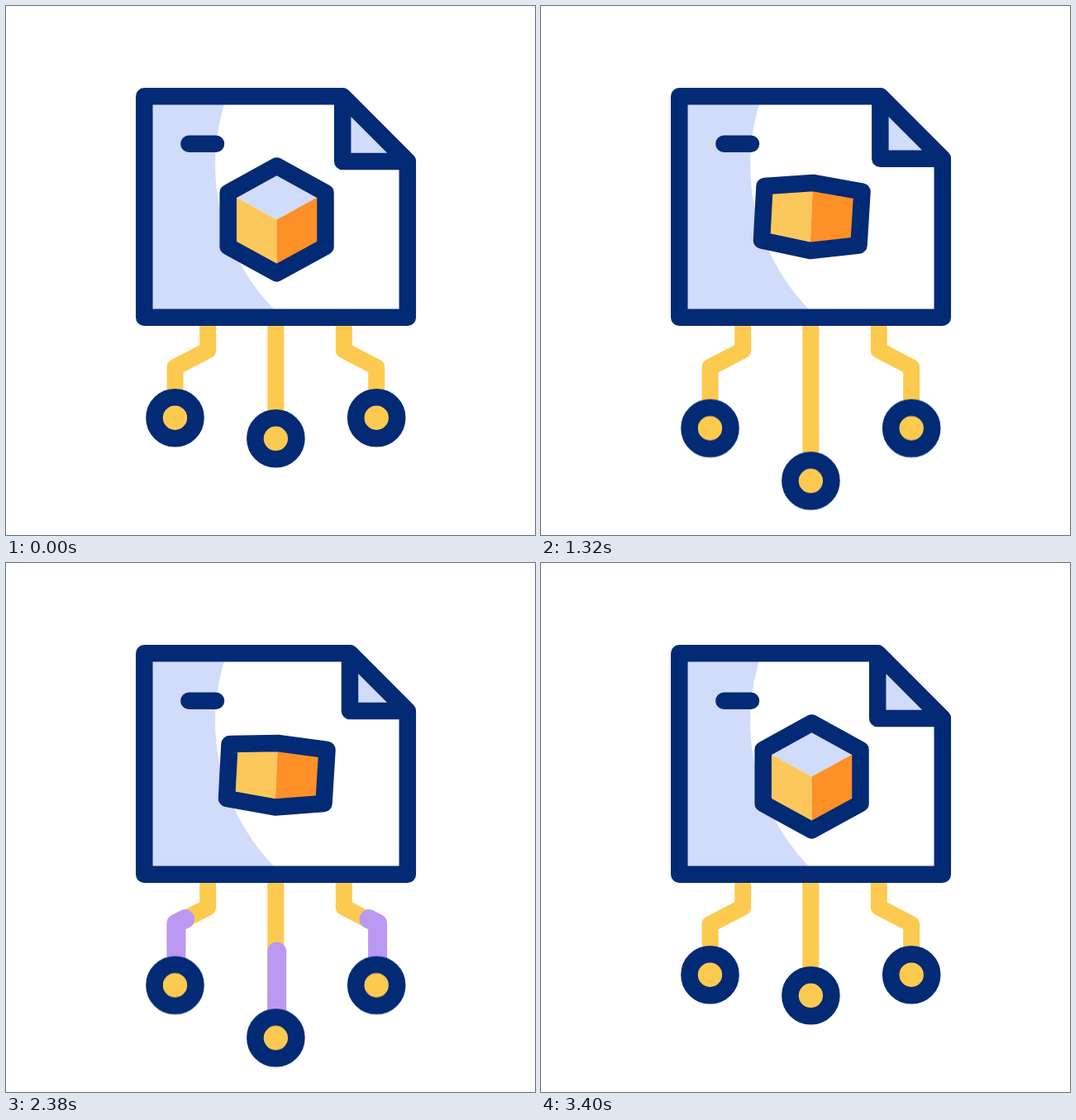
Recreate the animation shown at these times as an HTML page. Size 640 by 640 pixels, loop 3600 ms.

```html
<!DOCTYPE html>
<html lang="en">
<head>
<meta charset="utf-8">
<title>Contract network icon</title>
<style>
  html, body { margin: 0; width: 100%; height: 100%; overflow: hidden; background: #fff; }
  svg { display: block; width: 100vw; height: 100vh; }

  :root {
    --navy: #032a75;
    --light: #d1dbfa;
    --gold: #fdca50;
    --smooth: cubic-bezier(.3333, 0, .6667, 1);
    --rise: cubic-bezier(.3333, 0, .6667, .5);
    --settle: cubic-bezier(.3333, .5, .6667, 1);
  }

  .ink { fill: none; stroke: var(--navy); stroke-width: 20.5; stroke-linejoin: round; stroke-linecap: round; }
  .wire { fill: none; stroke: var(--gold); stroke-width: 20; stroke-linejoin: round; }
  .pulse { fill: none; stroke: #bb99f2; stroke-width: 23; stroke-linejoin: round; stroke-linecap: round; }
  .node { fill: var(--gold); stroke: var(--navy); stroke-width: 20.6; }

  .node, .sheet, .fold { animation: 3600ms var(--smooth) infinite; }
  .node { animation-name: drop; }
  .sheet { animation-name: sheet; }
  .fold { animation-name: fold; fill: var(--light); }
  .side { --drop: 12.6px; }
  .mid { --drop: 51.2px; }

  .pulse { animation: 3600ms linear infinite flow, 3600ms var(--smooth) infinite; }
  .pulse.left { animation-name: flow, left; }
  .pulse.mid { animation-name: flow, mid; }
  .pulse.right { animation-name: flow, right; }

  .cube path { animation: 3600ms infinite; }
  .cube .top { fill: var(--light); animation-name: top; }
  .cube .base { fill: #ff6250; animation-name: base; }
  .cube .west { fill: #fdc85b; animation-name: west; }
  .cube .east { fill: #fd9027; animation-name: east; }
  .cube .hull { animation-name: hull; }

  /* Nodes sink, wait, then spring back up */
  @keyframes drop {
    0%, 5.556%, 94.444%, 100% { transform: none; }
    27.778%, 83.333% { transform: translateY(var(--drop)); }
  }
  @keyframes left {
    0%, 5.556%, 94.444%, 100% { d: path("M245.4 374 V416 L206 436 V492"); }
    27.778%, 83.333% { d: path("M245.4 374 V416 L206 436 V505"); }
  }
  @keyframes mid {
    0%, 5.556%, 94.444%, 100% { d: path("M327.7 374 V523.3"); }
    27.778%, 83.333% { d: path("M327.7 374 V574.5"); }
  }
  @keyframes right {
    0%, 5.556%, 94.444%, 100% { d: path("M410 374 V416 L449.6 436 V492"); }
    27.778%, 83.333% { d: path("M410 374 V416 L449.6 436 V505"); }
  }

  /* Two pulses run down the wires and vanish under the nodes */
  @keyframes flow {
    0%, 5.556%, 48.889% { stroke-dasharray: 0 2; stroke-dashoffset: 0; }
    12.222%, 55.556% { stroke-dasharray: .43 2; stroke-dashoffset: -.178; }
    16.667%, 60% { stroke-dasharray: .7 2; stroke-dashoffset: -.3; }
    22.778%, 66.111% { stroke-dasharray: .522 2; stroke-dashoffset: -.478; }
    36.667%, 48.888%, 80%, 100% { stroke-dasharray: .05 2; stroke-dashoffset: -.95; }
  }

  /* The page corner shrinks and grows */
  @keyframes sheet {
    0%, 27.778%, 83.333%, 100% { d: path("M167.3 109.3 H407.2 L485.8 187.9 V376.8 H167.3 Z"); }
    55.556% { d: path("M167.3 109.3 H420.2 L485.8 174.9 V376.8 H167.3 Z"); }
  }
  @keyframes fold {
    0%, 27.778%, 83.333%, 100% { d: path("M407.2 109.3 V187.9 H485.8 Z"); }
    55.556% { d: path("M420.2 109.3 V174.9 H485.8 Z"); }
  }

  /* The cube tips back to show its base, then returns */
  @keyframes hull {
    0%, 27.778%, 75%, 100% { d: path("M327.5 193.5 L386.5 226 L386.5 291 L327.5 323.3 L268.7 291 L268.7 226 Z"); animation-timing-function: var(--rise); }
    36.667% { d: path("M329 214 L388.5 224.5 L384.5 289.5 L325.5 296 L267 283.5 L270.5 218 Z"); animation-timing-function: var(--settle); }
    45.556%, 57.222% { d: path("M324.5 187.5 L385.5 223 L388 290 L332.5 322.5 L270.5 296 L267.5 229 Z"); animation-timing-function: var(--rise); }
    66.111% { d: path("M329 218 L388.5 226 L384.5 291 L325.5 295.5 L267 285 L270.5 219 Z"); animation-timing-function: var(--settle); }
  }
  @keyframes top {
    0%, 27.778%, 75%, 100% { d: path("M327.5 193.5 L386.5 226 L327.5 258.5 L268.7 226 Z"); animation-timing-function: var(--rise); }
    36.667% { d: path("M329 214 L388.5 224.5 L329 214 L270.5 218 Z"); animation-timing-function: var(--settle); }
    45.556%, 57.222% { d: path("M324.5 187.5 L385.5 223 L324.5 187.5 L267.5 229 Z"); animation-timing-function: var(--rise); }
    66.111% { d: path("M329 218 L388.5 226 L329 218 L270.5 219 Z"); animation-timing-function: var(--settle); }
  }
  @keyframes base {
    0%, 27.778%, 75%, 100% { d: path("M327.5 323.3 L386.5 291 L327.5 323.3 L268.7 291 Z"); animation-timing-function: var(--rise); }
    36.667% { d: path("M325.5 296 L384.5 289.5 L325.5 296 L267 283.5 Z"); animation-timing-function: var(--settle); }
    45.556%, 57.222% { d: path("M328 262 L388 290 L332.5 322.5 L270.5 296 Z"); animation-timing-function: var(--rise); }
    66.111% { d: path("M325.5 295.5 L384.5 291 L325.5 295.5 L267 285 Z"); animation-timing-function: var(--settle); }
  }
  @keyframes west {
    0%, 27.778%, 75%, 100% { d: path("M268.7 226 L327.5 258.5 L327.5 323.3 L268.7 291 Z"); animation-timing-function: var(--rise); }
    36.667% { d: path("M270.5 218 L329 214 L325.5 296 L267 283.5 Z"); animation-timing-function: var(--settle); }
    45.556%, 57.222% { d: path("M267.5 229 L324.5 187.5 L328 262 L270.5 296 Z"); animation-timing-function: var(--rise); }
    66.111% { d: path("M270.5 219 L329 218 L325.5 295.5 L267 285 Z"); animation-timing-function: var(--settle); }
  }
  @keyframes east {
    0%, 27.778%, 75%, 100% { d: path("M386.5 226 L327.5 258.5 L327.5 323.3 L386.5 291 Z"); animation-timing-function: var(--rise); }
    36.667% { d: path("M388.5 224.5 L329 214 L325.5 296 L384.5 289.5 Z"); animation-timing-function: var(--settle); }
    45.556%, 57.222% { d: path("M385.5 223 L324.5 187.5 L328 262 L388 290 Z"); animation-timing-function: var(--rise); }
    66.111% { d: path("M388.5 226 L329 218 L325.5 295.5 L384.5 291 Z"); animation-timing-function: var(--settle); }
  }
</style>
</head>
<body>
<svg viewBox="0 0 640 640">
  <path class="wire" d="M244.2 377 V416.5 L204.6 437 V490"/>
  <path class="wire" d="M326.3 377 V550"/>
  <path class="wire" d="M408.8 377 V416.5 L448.2 437 V490"/>

  <path class="pulse left" pathLength="1" d="M245.4 374 V416 L206 436 V492"/>
  <path class="pulse mid" pathLength="1" d="M327.7 374 V523.3"/>
  <path class="pulse right" pathLength="1" d="M410 374 V416 L449.6 436 V492"/>

  <circle class="node side" cx="204.5" cy="498.2" r="25"/>
  <circle class="node mid" cx="326.4" cy="523.3" r="25"/>
  <circle class="node side" cx="448.2" cy="498.2" r="25"/>

  <path fill="#fff" d="M167 200 H486 V377 H167 Z"/>
  <path fill="#d1dbfa" d="M167 109 H267.1 A251 251 0 0 0 334.4 377 H167 Z"/>
  <path class="ink sheet" d="M167.3 109.3 H407.2 L485.8 187.9 V376.8 H167.3 Z"/>
  <path class="ink fold" d="M407.2 109.3 V187.9 H485.8 Z"/>
  <path class="ink" d="M221.4 166.8 H254"/>

  <g class="cube">
    <path class="top"/>
    <path class="base"/>
    <path class="west"/>
    <path class="east"/>
    <path class="ink hull"/>
  </g>
</svg>
</body>
</html>
```
